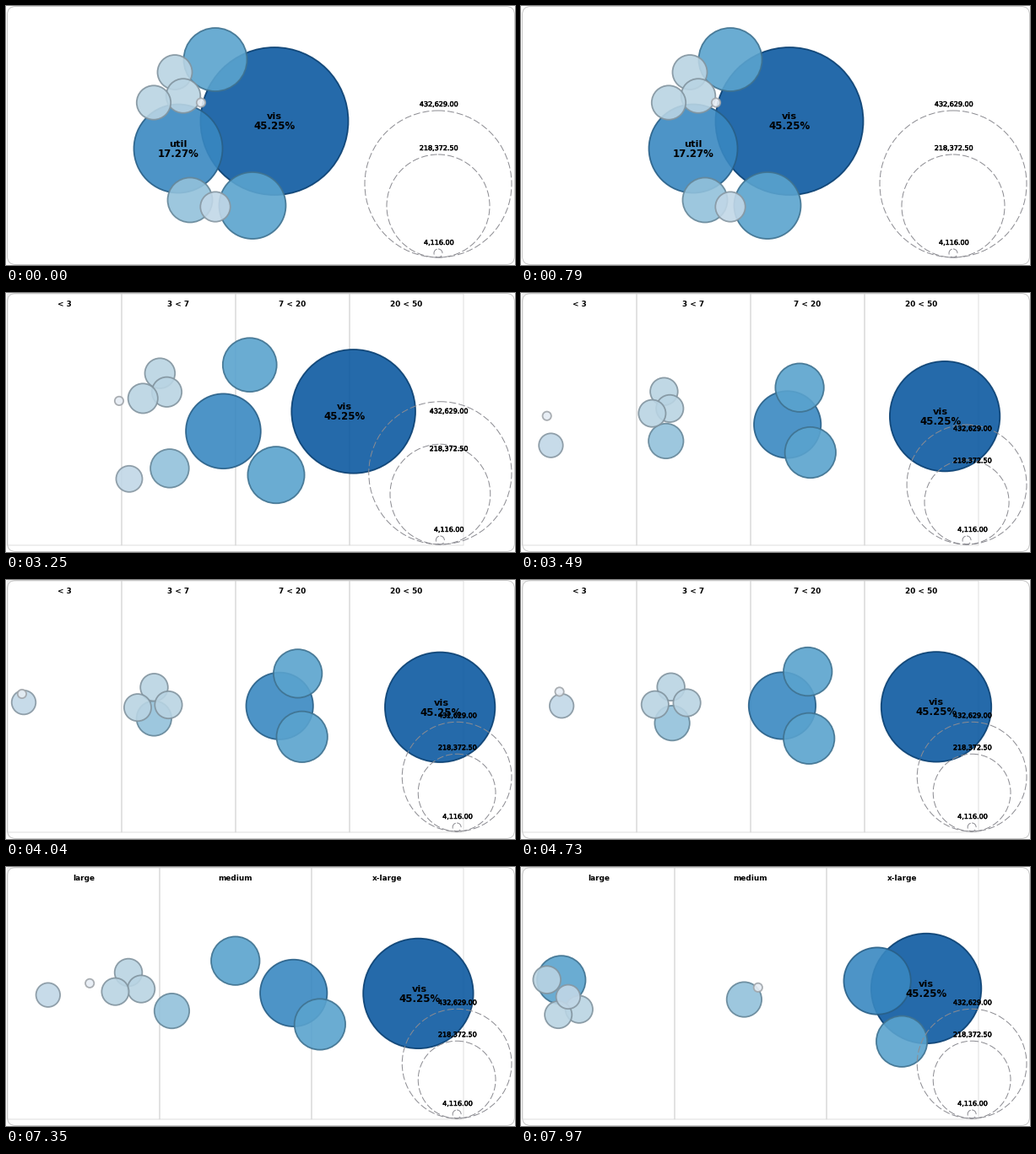
A matplotlib script for the animation above (8000 ms loop, 603x307 px).

```python
import math

import matplotlib.pyplot as plt
import numpy as np
from matplotlib.animation import FuncAnimation
from matplotlib.colors import to_rgb
from matplotlib.patches import Circle, FancyBboxPatch, Rectangle
from matplotlib.patheffects import withStroke

W, H, DPI = 603, 307, 100
PX = 72 / DPI
LOOP, INTERVAL = 8000, 20
START, STEP = 2960, 77.1           # first visible move and redraw cadence
SPLIT, REGROUP, TICK = 2874, 7156, 28
FRICTION, PULL = 0.9, 0.132
MIN_R, SHRINK = 5, 0.73

# radius, packed centre, column when split, column when regrouped, fill
BUBBLES = [
    (87.5, 318, 136.5, 3, 2, "#0d5aa1"),
    (52.5, 204, 169.0, 2, 2, "#3988c1"),
    (39.5, 292, 236.5, 2, 2, "#5aa3ce"),
    (37.5, 248, 63.5, 2, 0, "#5aa3ce"),
    (26.5, 218, 230.0, 1, 1, "#92c1db"),
    (20.5, 200, 78.5, 1, 0, "#b9d4e3"),
    (20.3, 210, 106.5, 1, 0, "#b9d4e3"),
    (20.2, 175, 114.5, 1, 0, "#b9d4e3"),
    (17.7, 248, 238.0, 0, 0, "#c1d7e7"),
    (5.2, 231, 114.5, 0, 1, "#e6edf4"),
]
LABELS = [("vis", "45.25%"), ("util", "17.27%")]
LEGEND = [(87, "432,629.00"), (61, "218,372.50"), (5, "4,116.00")]
GROUPS = [(135, ["< 3", "3 < 7", "7 < 20", "20 < 50"]),
          (180, ["large", "medium", "x-large"])]
LEFT, TOP, FLOOR, RIGHT = 2, 1, 299, 599
MIDDLE = 150


def ease(t, duration):
    u = min(max((t - SPLIT) / duration, 0.0), 1.0)
    return 4 * u ** 3 if u < 0.5 else 1 - 4 * (1 - u) ** 3


def scaled(r, k):
    return MIN_R + (r - MIN_R) * (1 - (1 - SHRINK) * k)


def column_x(width, col):
    return LEFT + width * (col + 0.5)


# Force layout: bubbles repel by area and are pulled to their column.
radii, packed_x, packed_y, split_col, regroup_col = np.array([b[:5] for b in BUBBLES]).T
charge = scaled(radii, 1) ** 2 / 8


def force_tick(pos, prev, goal, alpha):
    gap = pos[None] - pos[:, None]
    dist2 = (gap ** 2).sum(axis=2) + np.eye(len(pos))
    push = alpha * (gap * (charge / dist2)[..., None]).sum(axis=1)
    new = pos + FRICTION * (pos - prev - push)
    return new + (goal - new) * PULL * alpha


def simulate(track, cols, width, ticks):
    goal = np.column_stack([column_x(width, cols), np.full(len(cols), MIDDLE)])
    alpha = 0.1
    for _ in range(ticks):
        alpha *= 0.99
        track.append(force_tick(track[-1], track[-2], goal, alpha))


packed = np.column_stack([packed_x, packed_y])
track = [packed, packed]
split_ticks = (REGROUP - SPLIT) // TICK
simulate(track, split_col, GROUPS[0][0], split_ticks)
simulate(track, regroup_col, GROUPS[1][0], (LOOP - REGROUP) // TICK + 1)


def tick_index(t):
    """Place in the track; one entry before it is the previous tick."""
    if t < START:
        return 1
    if t < REGROUP:
        return 1 + int((t - SPLIT) / TICK)
    return 1 + split_ticks + int((t - REGROUP) / TICK)


fig = plt.figure(figsize=(W / DPI, H / DPI), dpi=DPI, facecolor="white")
ax = fig.add_axes([0, 0, 1, 1])
ax.set_xlim(0, W)
ax.set_ylim(H, 0)
ax.axis("off")


def write(s, size, x=0, y=0, z=5, **kw):
    return ax.text(x, y, s, fontsize=size * PX, family="DejaVu Sans",
                   ha="center", va="baseline", zorder=z, **kw)


def make_panels(width, names):
    parts = []
    for i, s in enumerate(names):
        frame = Rectangle((LEFT + width * i, TOP), width, FLOOR - TOP, fc="none",
                          ec="#cccccc", alpha=0.65, lw=PX, snap=False, zorder=1)
        parts.append(ax.add_patch(frame))
        parts.append(write(s, 8.9, column_x(width, i), 16.5, weight="bold"))
    return parts


ax.add_patch(FancyBboxPatch((11.5, 10.5), W - 22, H - 21, fc="none", ec="#c8c8c8",
                            lw=PX, boxstyle="round,pad=10,rounding_size=10", zorder=2))
panels = [make_panels(*g) for g in GROUPS]

discs = []
for i, (r, x, y, *_, fill) in enumerate(BUBBLES):
    rgb = to_rgb(fill)
    edge = tuple(c * 0.7 for c in rgb)
    discs.append(ax.add_patch(Circle((x, y), r, fc=rgb + (0.9,), ec=edge + (0.9,),
                                     lw=1.8 * PX, zorder=3 + i * 0.01)))

captions = [(write(name, 11.2, weight="bold"), write(share, 11.7, weight="bold"))
            for name, share in LABELS]

rings, marks = [], []
for r, s in LEGEND:
    rings.append(ax.add_patch(Circle((0, 0), r, fc="none", ec="#8c8c92", lw=PX,
                                     ls=(0, (8, 3)), zorder=4)))
    marks.append(write(s, 8, z=6, path_effects=[
        withStroke(linewidth=0.5 * PX, foreground="black")]))


def clock(i):
    t = (i + 0.5) * INTERVAL
    if t < START:
        return 0.0
    return START + STEP * math.floor((t - START) / STEP + 0.2)


def update(i):
    t = clock(i)
    group = None if t < START else int(t >= REGROUP)
    for g, parts in enumerate(panels):
        for part in parts:
            part.set_visible(g == group)

    n = tick_index(t)
    shrink = min(max((t - SPLIT) / 500, 0.0), 1.0)
    for disc, r, centre in zip(discs, radii, track[n]):
        disc.center = centre
        disc.radius = scaled(r, shrink)

    # Captions trail their bubble by one tick.
    for (name, share), disc, (x, y) in zip(captions, discs, track[n - 1]):
        for text, dy in ((name, -2), (share, 10)):
            text.set_position((x, y + dy))
            text.set_visible(disc.radius > 51)

    ring_k, mark_k = ease(t, 1060), ease(t, 620)
    ring_x, mark_x = (RIGHT - scaled(LEGEND[0][0], k) for k in (ring_k, mark_k))
    for (r, _), ring, mark in zip(LEGEND, rings, marks):
        ring.radius = scaled(r, ring_k)
        ring.center = (ring_x, FLOOR - 1 - ring.radius)
        mark.set_position((mark_x + 0.5, FLOOR - 6 - 2 * scaled(r, mark_k)))
    return []


anim = FuncAnimation(fig, update, frames=LOOP // INTERVAL, interval=INTERVAL,
                     repeat=True, repeat_delay=0, blit=False)
plt.show()
```
